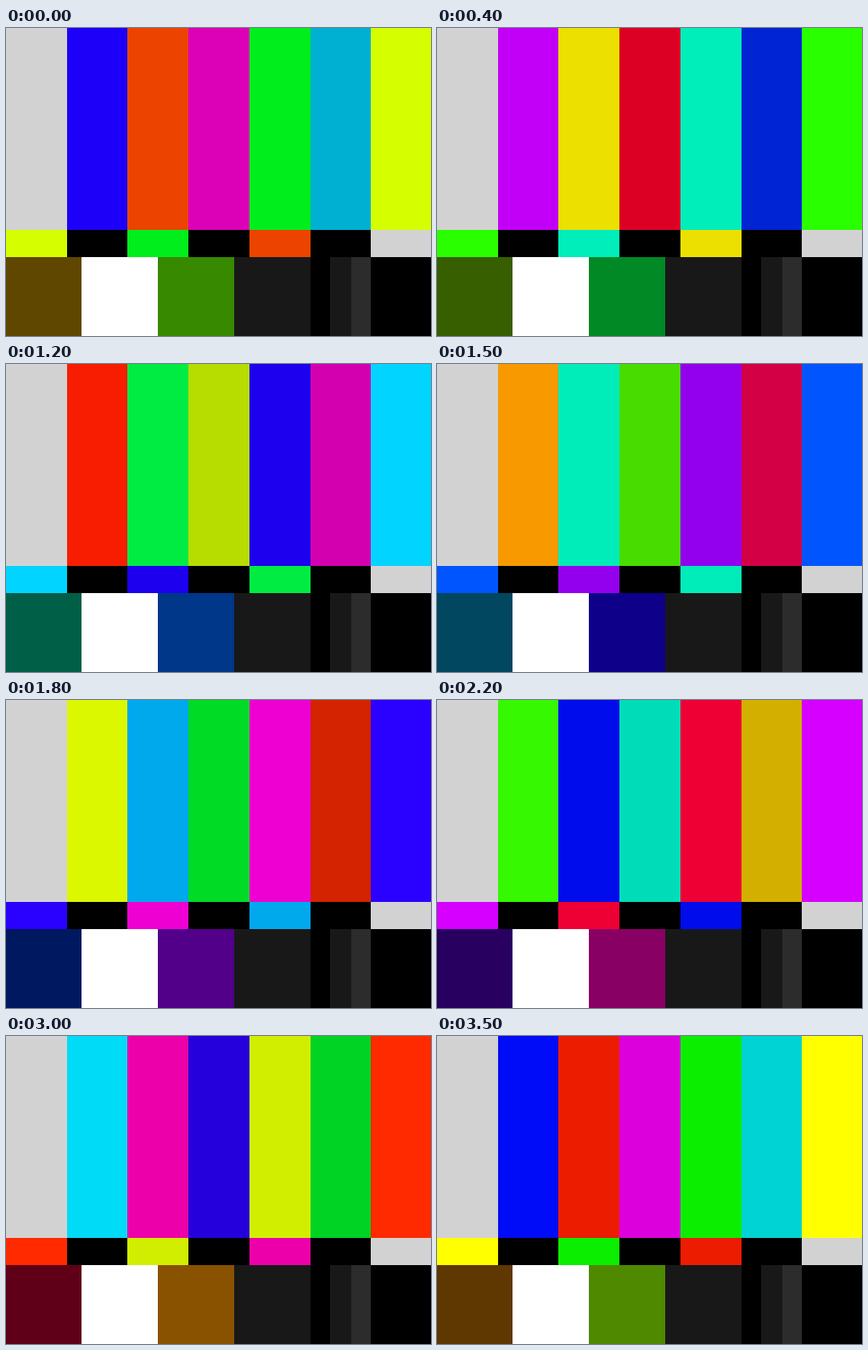
Recreate the animation shown at these times as an HTML page. Size 501 px wide and 363 px high, loop 3600 ms.

```html
<!DOCTYPE html>
<html lang="en">
<head>
<meta charset="utf-8">
<title>Colour bars</title>
<style>
  html, body { margin: 0; width: 100%; height: 100%; overflow: hidden; background: #000; }
  svg { display: block; width: 501px; height: 363px; }
</style>
</head>
<body>
<svg viewBox="0 0 501 363" shape-rendering="crispEdges"></svg>
<script>
const STEP = 100, STEPS = 36;
const GREY = '#d2d2d2', DARK = '#181818';

// Cycling paints: starting hue and peak channel value
const paints = {
  blue: [247, 248],
  orange: [17, 236],
  magenta: [310, 220],
  green: [127, 238],
  cyan: [190, 211],
  yellow: [70, 255],
  brown: [45, 95],
  olive: [96, 137]
};

// Each row: top, bottom, left edges, fills
const rows = [
  [0, 238, [0, 72, 143, 215, 287, 359, 430],
    [GREY, 'blue', 'orange', 'magenta', 'green', 'cyan', 'yellow']],
  [238, 270, [0, 72, 143, 215, 287, 359, 430],
    ['yellow', '#000', 'green', '#000', 'orange', '#000', GREY]],
  [270, 363, [0, 89, 179, 269, 359, 382, 407, 430],
    ['brown', '#fff', 'olive', DARK, '#000', DARK, '#2c2c2c', '#000']]
];

const svg = document.querySelector('svg');
const cycling = [];

for (const [top, bottom, edges, fills] of rows) {
  fills.forEach((fill, i) => {
    const rect = document.createElementNS('http://www.w3.org/2000/svg', 'rect');
    const right = edges[i + 1] ?? 501;
    const box = { x: edges[i], y: top, width: right - edges[i], height: bottom - top };
    for (const key in box) rect.setAttribute(key, box[key]);
    if (paints[fill]) cycling.push([rect, ...paints[fill]]);
    else rect.setAttribute('fill', fill);
    svg.append(rect);
  });
}

let shown = -1;

function draw(now) {
  const step = Math.floor(now / STEP) % STEPS;
  if (step !== shown) {
    shown = step;
    for (const [rect, hue, value] of cycling) {
      const angle = (hue + step * 360 / STEPS) % 360;
      rect.setAttribute('fill', `hsl(${angle}, 100%, ${value / 5.1}%)`);
    }
  }
}

function tick() {
  draw(performance.now());
  requestAnimationFrame(tick);
}

draw(0);
requestAnimationFrame(tick);
</script>
</body>
</html>
```
